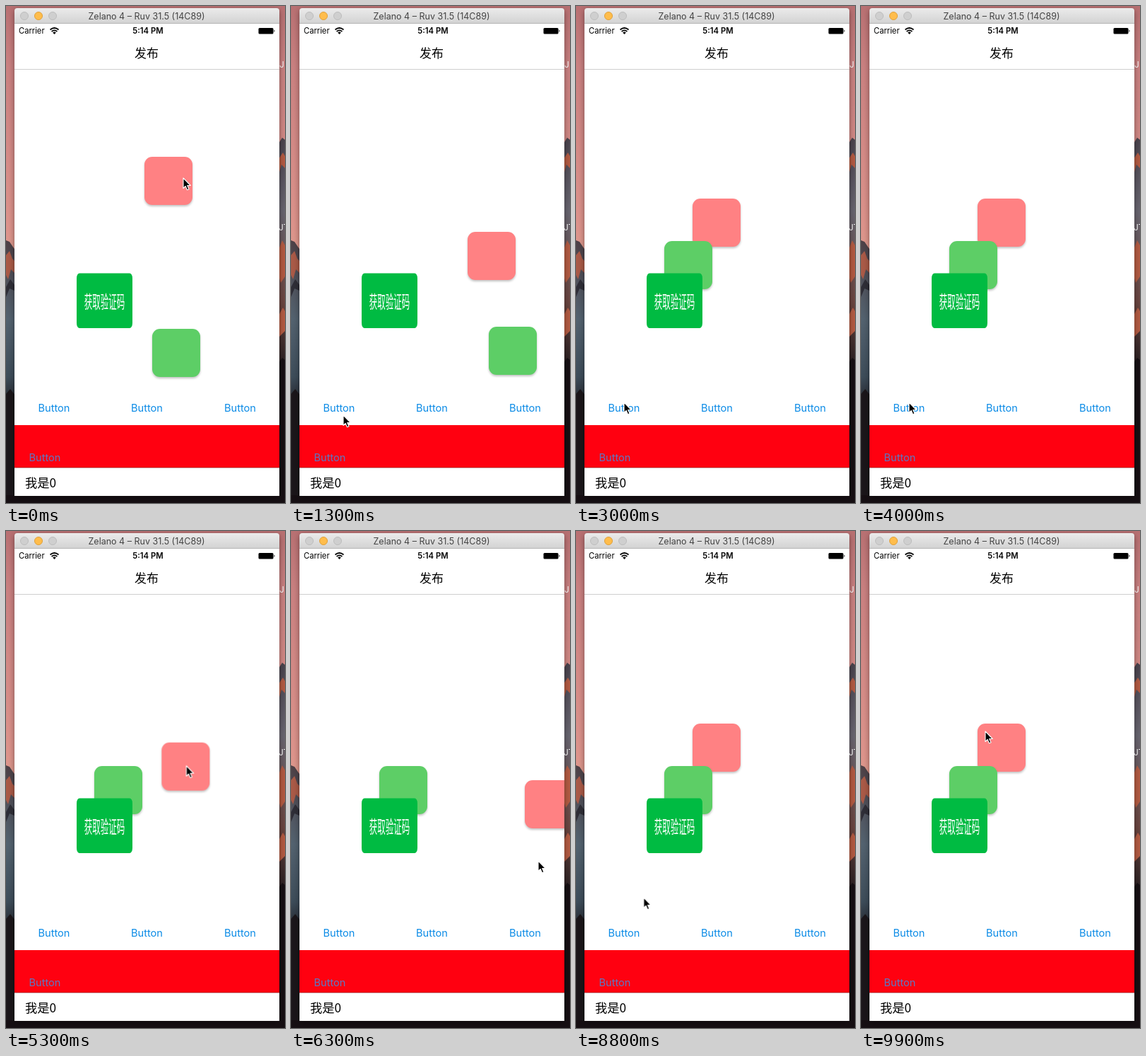
An HTML page that plays this animation: 395x702 px, repeating every 10 s.

```html
<!DOCTYPE html>
<html lang="zh">
<head>
<meta charset="utf-8">
<title>Draggable buttons</title>
<style>
html, body { margin: 0; width: 100%; height: 100%; overflow: hidden; background: #160f13; }
svg { display: block; width: 395px; height: 702px; }
text { font-family: Inter, "Noto Sans CJK SC", "Noto Sans CJK", sans-serif; }
.mid { text-anchor: middle; }
.cjk { font-family: "Noto Sans CJK SC", "Noto Sans CJK", sans-serif; }
.link { font-size: 14.6px; fill: #0b8be6; text-anchor: middle; }
.tile { filter: drop-shadow(0 2px 1.5px rgba(0, 0, 0, .24)); }
.move { animation: 10s linear infinite; }
#pink { animation-name: pink; }
#green { animation-name: green; }
#pointer { animation-name: pointer; }
#tap { animation: tap 10s step-end infinite; }

@keyframes pink {
  0%, 1% { transform: translate(196px, 213px); animation-timing-function: ease-in-out; }
  6%, 23.9% { transform: translate(250px, 319px); animation-timing-function: ease-in-out; }
  28%, 49% { transform: translate(165px, 272px); animation-timing-function: ease-in-out; }
  59%, 64% { transform: translate(331px, 352px); animation-timing-function: ease-out; }
  71%, 76.9% { transform: translate(292px, 400px); animation-timing-function: ease-in-out; }
  81%, 100% { transform: translate(165px, 272px); }
}
@keyframes green {
  0%, 2% { transform: translate(207px, 456px); animation-timing-function: ease-out; }
  10%, 14% { transform: translate(280px, 453px); animation-timing-function: ease-out; }
  19%, 23.9% { transform: translate(259px, 427px); animation-timing-function: ease-in-out; }
  28%, 100% { transform: translate(125px, 332px); }
}
@keyframes pointer {
  0%, 1% { transform: translate(251px, 243px); animation-timing-function: ease-in-out; }
  6%, 7% { transform: translate(305px, 349px); animation-timing-function: ease-in-out; }
  13%, 14% { transform: translate(74px, 578px); animation-timing-function: ease-out; }
  18%, 25% { transform: translate(67px, 568px); }
  30%, 41% { transform: translate(68px, 560px); animation-timing-function: ease-in-out; }
  48%, 49% { transform: translate(200px, 305px); animation-timing-function: ease-in-out; }
  59%, 60% { transform: translate(366px, 385px); animation-timing-function: ease-out; }
  63%, 64% { transform: translate(350px, 466px); animation-timing-function: ease-in-out; }
  73%, 85% { transform: translate(81px, 561px); animation-timing-function: ease-in-out; }
  96%, 100% { transform: translate(176px, 283px); }
}
@keyframes tap {
  0%, 24%, 77% { opacity: 1; }
  22%, 75% { opacity: .2; }
  100% { opacity: 1; }
}
</style>
</head>
<body>
<svg viewBox="0 0 395 702">
  <defs>
    <linearGradient id="sky" x2="0" y2="1">
      <stop offset="0" stop-color="#b87072"/>
      <stop offset=".12" stop-color="#c98080"/>
      <stop offset=".45" stop-color="#dc938b"/>
      <stop offset=".5" stop-color="#dd998c"/>
    </linearGradient>
    <linearGradient id="ridge" x2="0" y2="1">
      <stop offset="0" stop-color="#4d4046"/>
      <stop offset=".3" stop-color="#53626f"/>
      <stop offset=".52" stop-color="#3d4c59"/>
      <stop offset=".66" stop-color="#1b171b"/>
      <stop offset="1" stop-color="#120d10"/>
    </linearGradient>
    <linearGradient id="cliff" x2="0" y2="1">
      <stop offset="0" stop-color="#4a434d"/>
      <stop offset=".2" stop-color="#686570"/>
      <stop offset=".45" stop-color="#6b4540"/>
      <stop offset=".62" stop-color="#2a2022"/>
      <stop offset="1" stop-color="#120d10"/>
    </linearGradient>
    <linearGradient id="bar" x2="0" y2="1">
      <stop offset="0" stop-color="#ebebeb"/>
      <stop offset="1" stop-color="#d2d2d2"/>
    </linearGradient>
    <filter id="shade" x="-10%" y="-5%" width="120%" height="110%">
      <feGaussianBlur stdDeviation="4"/>
    </filter>
    <clipPath id="screen"><path d="M12 25H387V692H12Z"/></clipPath>
  </defs>

  <!-- desktop -->
  <path fill="url(#sky)" d="M0 0H395V702H0Z"/>
  <path fill="url(#ridge)" d="M0 331L5 333L9 339L14 346V702H0Z"/>
  <path fill="#a95a47" d="M0 352L5 346L9 357L13 361V378L7 372L3 386L0 380Z"/>
  <path fill="#2f2e37" d="M0 397L6 386L12 394V402L5 399L0 411Z"/>
  <path fill="#1b161a" d="M0 548L6 541L13 550V702H0Z"/>
  <path fill="url(#cliff)" d="M386 194L391 186L395 189V702H386Z"/>
  <path fill="#b45b42" d="M386 216L392 207L395 212V229L390 224L386 238ZM386 344L391 331L395 338V382L389 391L386 381ZM386 437L392 426L395 431V459L386 468Z"/>
  <path fill="#160f13" d="M386 504L391 497L395 500V702H386ZM0 691H395V702H0Z"/>
  <g fill="#fff" font-size="12">
    <text x="387" y="87">J</text>
    <text x="386" y="317">JT</text>
  </g>

  <!-- window -->
  <rect x="12" y="6" width="375" height="688" rx="4" opacity=".42" filter="url(#shade)"/>
  <path fill="#fff" d="M12 20H387V692H12Z"/>
  <path fill="url(#bar)" d="M12 25V7Q12 3 16 3H383Q387 3 387 7V25Z"/>
  <path stroke="#b5b5b5" d="M12 24.5H387"/>
  <g stroke="#bdbdbd" fill="#cfcfcf">
    <circle cx="26" cy="14" r="5.5"/>
    <circle cx="46" cy="14" r="5.5" fill="#ffbd4c" stroke="#e0a03a"/>
    <circle cx="66" cy="14" r="5.5"/>
  </g>
  <text class="mid" x="199" y="19" font-size="12.5" fill="#444">Zelano 4 – Ruv 31.5 (14C89)</text>

  <!-- status and navigation bars -->
  <text x="18" y="39" font-size="11.2">Carrier</text>
  <g fill="none" stroke="#000" stroke-width="1.7">
    <path d="M62.5 33.5Q68.5 28.5 74.5 33.5M64.6 36Q68.5 32.8 72.4 36"/>
    <path fill="#000" stroke="none" d="M66.2 37.4Q68.5 35.8 70.8 37.4L68.5 40Z"/>
  </g>
  <text class="mid" x="201" y="39" font-size="11.3" font-weight="600">5:14 PM</text>
  <rect x="357.5" y="31" width="21" height="8.5" rx="1.5"/>
  <path d="M379.5 33.5Q381.5 35.2 379.5 37Z"/>
  <text class="mid cjk" x="199" y="73" font-size="17" font-weight="500">发布</text>
  <path stroke="#cfcfcf" d="M12 89.5H387"/>

  <!-- content -->
  <text id="tap" class="link" x="68" y="572.5">Button</text>
  <text class="link" x="199.5" y="572.5">Button</text>
  <text class="link" x="331.5" y="572.5">Button</text>
  <path fill="#ff0010" d="M12 592H387V652H12Z"/>
  <text class="link" x="55" y="642.5" style="fill:#5b78c4">Button</text>
  <path stroke="#8a1016" stroke-width=".7" d="M12 652H387"/>
  <text class="cjk" x="27" y="680" font-size="17.3">我是0</text>

  <g clip-path="url(#screen)">
    <g id="pink" class="move"><rect class="tile" width="68" height="68" rx="11" fill="#ff8183"/></g>
    <g id="green" class="move"><rect class="tile" width="68" height="68" rx="11" fill="#5dce66"/></g>
    <rect x="100" y="377.5" width="79" height="77.5" rx="4" ry="7" fill="#00bb42"/>
    <text class="mid cjk" transform="translate(139.5 427) scale(.46 1)" font-size="25" fill="#fff">获取验证码</text>
  </g>

  <g id="pointer" class="move">
    <path stroke="#fff" stroke-width="1.1" stroke-linejoin="round" d="M0 0V14.5L3.2 11.5L5.5 16.8L8 15.7L5.7 10.5H10.3Z"/>
  </g>
</svg>
</body>
</html>
```
